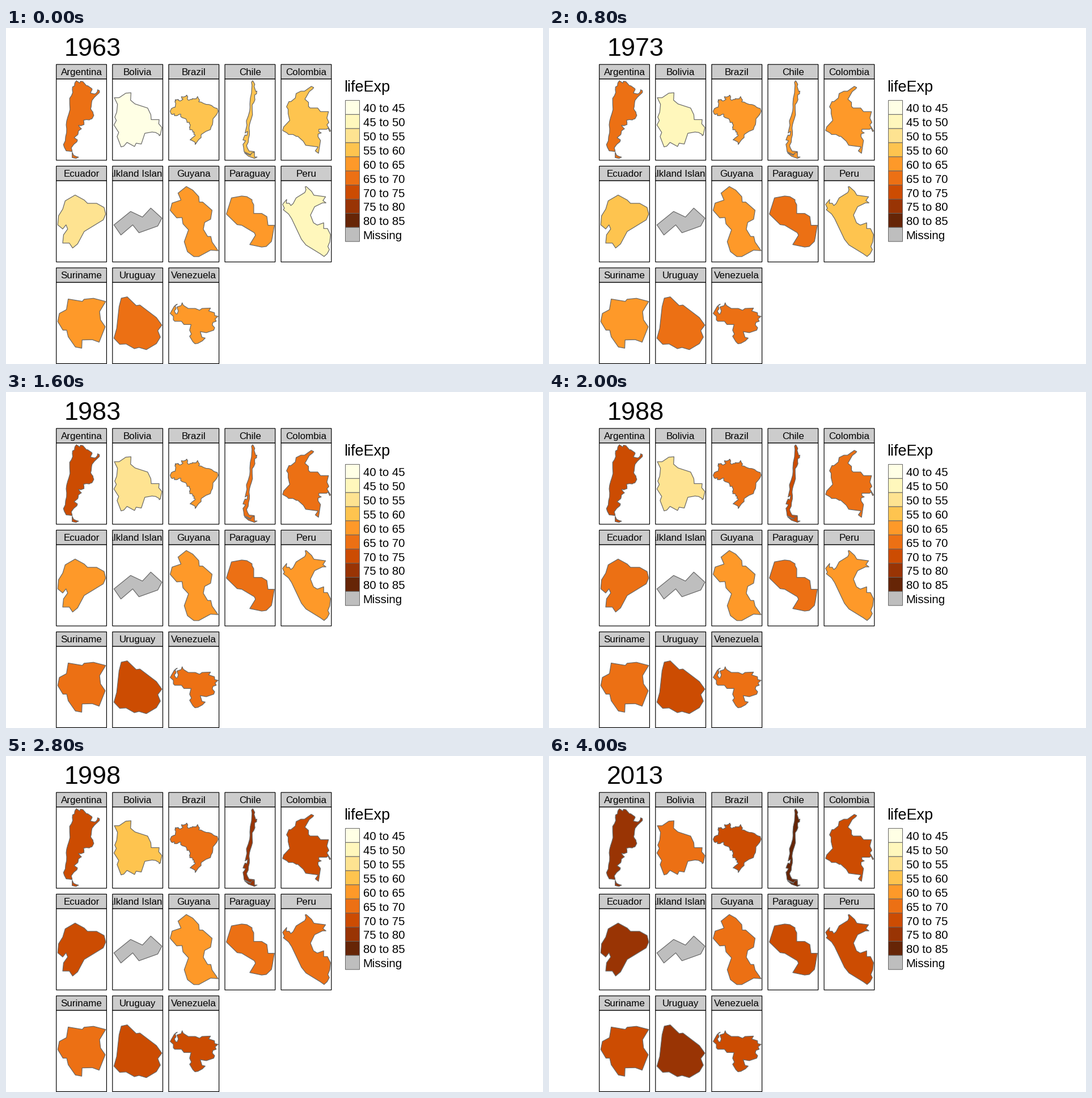
Recreate the animation shown at these times as a matplotlib script. Size 947 px wide and 592 px high, loop 4.4 s.

```python
import numpy as np
import matplotlib
import matplotlib.pyplot as plt
from matplotlib.animation import FuncAnimation
from matplotlib.collections import PolyCollection
from matplotlib.patches import Rectangle

W, H, DPI = 947, 592, 64
YEARS = range(1963, 2014, 5)
BINS = ["#FFFFE5", "#FFF7BC", "#FEE391", "#FEC44F", "#FE9929",
        "#EC7014", "#CC4C02", "#993404", "#662506"]
MISSING, EDGE = "#BEBEBE", "#666666"
PX = 72 / DPI
PANEL_W, STRIP_H, PANEL_H = 88.7, 25.5, 143.3

matplotlib.rcParams["font.family"] = "Liberation Sans"
fig = plt.figure(figsize=(W / DPI, H / DPI), dpi=DPI, facecolor="white")
ax = fig.add_axes([0, 0, 1, 1])
ax.set(xlim=(0, W), ylim=(H, 0))
ax.axis("off")
rng = np.random.default_rng(4)


def arc(*degrees):
    """Key points of a border in degrees west, degrees south."""
    return np.reshape(degrees, (-1, 2))


def rough(line, amount=0.07):
    """Break every segment at a point pushed sideways at random."""
    step = np.diff(line, axis=0)
    side = step[:, ::-1] * (1, -1)
    middle = line[:-1] + step / 2 + side * rng.uniform(-amount, amount, (len(step), 1))
    out = np.empty((2 * len(line) - 1, 2))
    out[::2], out[1::2] = line, middle
    return out


def back(line):
    return line[::-1]


def ring(*arcs):
    return np.vstack(arcs)


# Borders shared by two neighbours
arg_bol = arc(67.1, 22.7, 66.3, 21.8, 64.4, 22.8, 64, 22, 62.7, 22.2)
arg_pry = arc(62.7, 22.2, 60.8, 23.9, 60, 24, 57.8, 25.2, 57.6, 25.6, 58.6, 27.1,
              56.5, 27.5, 55.7, 27.4, 54.8, 26.6, 54.6, 25.7)
arg_bra = arc(54.6, 25.7, 53.6, 26.1, 53.6, 26.9, 56.3, 28.9, 57.63, 30.22)
arg_ury = arc(57.63, 30.22, 57.87, 31, 58.13, 33, 58.43, 33.9)
arg_chl = rough(arc(67.1, 22.7, 67.3, 24, 68.4, 24.5, 68.3, 26.9, 70, 29.4, 69.8, 34.2,
                    71.1, 37.6, 71.9, 40.8, 71.7, 44.2, 72.4, 47.7, 73.4, 49.3,
                    72.3, 51.4, 71.9, 52, 68.6, 52.3))
bol_chl = arc(67.1, 22.7, 67.8, 22.9, 68.8, 20.4, 68.4, 19.4, 69.6, 17.6)
bol_per = arc(69.6, 17.6, 69, 16.5, 69.4, 15.7, 68.9, 14.5, 68.7, 12.6, 69.5, 11)
bol_bra = arc(69.5, 11, 68.3, 11, 66.6, 9.9, 65.3, 9.8, 65.4, 11.6, 64.3, 12.5,
              61.1, 13.5, 60.3, 15.1, 60.2, 16.3, 58.2, 16.3, 58.3, 17.3, 57.5, 18.2,
              57.9, 20, 58.2, 20.2)
bol_pry = arc(58.2, 20.2, 58.2, 19.9, 59.1, 19.4, 60, 19.3, 61.8, 19.6, 62.7, 22.2)
bra_pry = arc(58.2, 20.2, 57.9, 20.7, 57.9, 22.1, 56.5, 22.1, 55.6, 22.6, 55.4, 24,
              54.3, 24, 54.6, 25.7)
bra_ury = arc(57.63, 30.22, 56.98, 30.1, 56, 30.9, 55.6, 30.85, 53.8, 32, 53.2, 32.7,
              53.65, 33.2, 53.37, 33.8)
bra_per = arc(69.5, 11, 70.5, 11, 70.5, 9.5, 72.2, 10.1, 73.2, 9.5, 74, 7.5, 72.9, 5.3,
              70.8, 4.3, 69.9, 4.3)
bra_col = arc(69.9, 4.3, 69.4, 1.1, 70, .2, 70, -.5, 69.2, -.8, 69.8, -1.1, 69.8, -1.7,
              67.9, -1.7, 67.5, -2, 67.1, -1.1, 66.9, -1.3)
bra_ven = arc(66.9, -1.3, 66.3, -.7, 65.5, -.8, 64.2, -1.5, 63.4, -2.3, 64.3, -2.5,
              64.8, -4.1, 63.1, -3.8, 61, -4.5, 60.73, -5.2)
bra_guy = arc(60.73, -5.2, 60.2, -5.24, 60.1, -4.6, 59.54, -4, 59.97, -2.8, 59.65, -1.8,
              59, -1.3, 58.5, -1.3, 57.3, -1.95, 56.54, -1.9)
bra_sur = arc(56.54, -1.9, 56, -1.8, 55.97, -2.5, 55.1, -2.52, 54.52, -2.31)
per_ecu = arc(80.3, 3.4, 80.4, 4.4, 79.6, 4.4, 79.2, 5, 78.6, 4.5, 77.8, 3, 75.5, 1.6,
              75.2, .9, 75.4, .1)
per_col = arc(75.4, .1, 75.1, .05, 73.7, 1.3, 73.1, 2.3, 70, 2.7, 70.7, 3.7, 69.9, 4.3)
col_ecu = arc(75.4, .1, 76.3, -.4, 77.4, -.4, 77.8, -.8, 78.9, -1.4)
col_ven = arc(71.3, -11.8, 72.2, -11.1, 73, -9.7, 73.3, -9.2, 72.4, -8.4, 72.4, -7.4,
              72, -7, 70.1, -7, 69.4, -6.1, 67.4, -6.1, 67.8, -4.5, 67.3, -3.4,
              67.8, -2.8, 66.9, -1.3)
ven_guy = arc(59.76, -8.37, 60.6, -7.7, 60.3, -7, 61.2, -6.7, 61.4, -5.96, 60.73, -5.2)
guy_sur = arc(57.15, -5.97, 57.3, -5.07, 57.9, -4.75, 58.04, -4.06, 57.6, -3.33,
              57.28, -3.33, 57.15, -2.77, 56.54, -1.9)

# Coasts
arg_sea = rough(arc(58.43, 33.9, 57.2, 35.3, 56.7, 36.7, 57.7, 38.2, 59.2, 38.7,
                    62.3, 38.8, 62.1, 40.7, 63.8, 41.2, 65.1, 41, 63.5, 42.5, 65.2, 43.5,
                    65.5, 45, 67.5, 46.3, 65.7, 47.3, 66, 48.1, 69.1, 50.7, 68.6, 52.3))
chl_sea = rough(arc(68.6, 52.3, 71, 53.8, 74.9, 52.3, 75.6, 48.7, 74.1, 46.9, 75.6, 46.6,
                    74.3, 44.1, 73.2, 44.4, 72.7, 42.4, 74.3, 43.2, 73.2, 39.3,
                    73.5, 37.2, 71.5, 32.4, 71.4, 29, 70.4, 23.6, 70.1, 19.8, 70.4, 18.3))
bra_sea = rough(arc(54.52, -2.31, 52.6, -2.4, 51.5, -4.2, 49.9, -1.4, 50.5, 0, 48.6, .2,
                    44.5, 2, 40, 2.9, 37.2, 4.8, 35.3, 5.3, 34.7, 7.3, 35.6, 9.6,
                    38.9, 13.5, 39.3, 18, 41, 22, 44.6, 23.4, 48.5, 25.9, 48.6, 28.3,
                    52.3, 32.2, 53.37, 33.8))
col_sea = arc(78.9, -1.4, 78.6, -2.3, 77.1, -3.9, 77.5, -5.6, 77.5, -6.7, 77.9, -7.3,
              77.3, -8.6, 76.8, -8.6, 75.7, -9.5, 75.5, -10.6, 74.3, -11.2, 73.4, -11.2,
              71.7, -12.4, 71.1, -12.1, 71.3, -11.8)
ecu_sea = arc(78.9, -1.4, 80.1, -.7, 80.4, .3, 80.9, 1.1, 81, 2.2, 80.4, 2.7, 80, 2.2,
              79.8, 2.7, 80.3, 3.4)
per_sea = arc(70.4, 18.3, 71.4, 17.6, 75.2, 15.3, 76.4, 13.8, 79, 8.4, 79.8, 7.2,
              81.2, 6.1, 80.9, 5.7, 81.4, 4.7, 80.3, 3.4)
guy_sea = arc(59.76, -8.37, 59.1, -8, 58.5, -7.35, 58.45, -6.8, 58.1, -6.8, 57.15, -5.97)
sur_sea = arc(57.15, -5.97, 55.95, -5.77, 55.8, -5.95, 55, -6.03, 53.96, -5.76,
              54.48, -4.9, 54.4, -4.2, 54, -3.62, 54.52, -2.31)
ury_sea = arc(53.37, 33.8, 53.8, 34.4, 54.9, 34.95, 55.7, 34.75, 56.2, 34.86,
              57.1, 34.43, 57.8, 34.46, 58.43, 33.9)
ven_sea = arc(71.3, -11.8, 71.9, -11.4, 71.6, -10.5, 72.1, -9.9, 71.7, -9.1, 71.3, -9.1,
              71, -9.9, 71.4, -11, 70.2, -11.4, 69.9, -12.2, 69.6, -11.5, 68.2, -10.6,
              66.2, -10.6, 65, -10.1, 64.3, -10.6, 61.9, -10.7, 62.4, -9.9, 60.8, -9.4,
              60.7, -8.6, 59.76, -8.37)

# Islands
fuego_east = arc(65.1, 54.7, 66.5, 55.25, 68.6, 54.9, 68.6, 52.6, 67.8, 53.9, 66.5, 54.4)
fuego_west = arc(68.6, 52.6, 68.6, 54.9, 67, 54.9, 68.6, 55.6, 72.3, 54.5, 74.7, 52.8,
                 71.1, 54.1, 70.3, 52.9)
falklands = arc(61.2, 51.85, 60, 51.25, 59.15, 51.5, 58.55, 51.1, 57.75, 51.55,
                58.05, 51.9, 59.4, 52.2, 59.85, 51.85, 60.7, 52.3)

# Name, outlines, first colour bin (None = no data), years in which the bin rises
COUNTRIES = [
    ("Argentina", [ring(arg_bol, arg_pry, arg_bra, arg_ury, arg_sea, back(arg_chl)),
                   fuego_east], 5, (1983, 2008)),
    ("Bolivia", [ring(bol_chl, bol_per, bol_bra, bol_pry, back(arg_bol))],
     0, (1973, 1983, 1993, 2003, 2008)),
    ("Brazil", [ring(bra_per, bra_col, bra_ven, bra_guy, bra_sur, bra_sea, back(bra_ury),
                     back(arg_bra), back(bra_pry), back(bol_bra))], 3, (1973, 1988, 2003)),
    ("Chile", [ring(arg_chl, chl_sea, back(bol_chl)), fuego_west],
     3, (1968, 1978, 1988, 1998, 2013)),
    ("Colombia", [ring(col_ecu, col_sea, col_ven, back(bra_col), back(per_col))],
     3, (1968, 1983, 1998)),
    ("Ecuador", [ring(ecu_sea, per_ecu, col_ecu)], 2, (1968, 1978, 1988, 1993, 2013)),
    ("Falkland Islands", [falklands], None, ()),
    ("Guyana", [ring(guy_sea, guy_sur, back(bra_guy), back(ven_guy))], 4, (2003,)),
    ("Paraguay", [ring(bol_pry, arg_pry, back(bra_pry))], 4, (1968, 2003)),
    ("Peru", [ring(per_sea, per_ecu, per_col, back(bra_per), back(bol_per))],
     1, (1968, 1973, 1983, 1993, 2003)),
    ("Suriname", [ring(sur_sea, back(bra_sur), back(guy_sur))], 4, (1978, 2013)),
    ("Uruguay", [ring(bra_ury, ury_sea, back(arg_ury))], 5, (1983, 2003)),
    ("Venezuela", [ring(ven_sea, ven_guy, back(bra_ven), back(col_ven))],
     4, (1973, 1993)),
]


def text(x, y, string, size, **kw):
    return ax.text(x, y, string, fontsize=size * PX, va="baseline", **kw)


def box(x, y, w, h, fill, edge="black", lw=1.2):
    return ax.add_patch(Rectangle((x, y), w, h, fc=fill, ec=edge, lw=lw * PX, snap=False))


def project(parts, cx, cy, width=84.6, height=137):
    """Fit outlines into a panel, degrees corrected at the middle latitude."""
    points = np.vstack(parts)
    low, high = points.min(0), points.max(0)
    mid = (low + high) / 2
    squeeze = np.cos(np.radians(mid[1]))
    span = high - low
    scale = min(width / (span[0] * squeeze), height / span[1])
    return [(p - mid) * (-scale * squeeze, scale) + (cx, cy) for p in parts]


def bin_colour(start, rises, year):
    if start is None:
        return MISSING
    return BINS[start + sum(year >= r for r in rises)]


maps = []
for i, (name, parts, start, rises) in enumerate(COUNTRIES):
    row, col = divmod(i, 5)
    x, y = 88.7 + 99.1 * col, 64.2 + 179.2 * row
    cx = x + PANEL_W / 2
    box(x, y + STRIP_H, PANEL_W, PANEL_H, "white")
    strip = box(x, y, PANEL_W, STRIP_H, "#CCCCCC")
    label = text(cx, y + 18.6, name, 17, ha="center", clip_on=True)
    label.set_clip_path(strip)
    shape = PolyCollection(project(parts, cx, y + 97.1),
                           edgecolors=EDGE, linewidths=1.2 * PX, zorder=2)
    ax.add_collection(shape, autolim=False)
    maps.append((shape, start, rises))

text(596, 112, "lifeExp", 27)
labels = [f"{a} to {a + 5}" for a in range(40, 85, 5)] + ["Missing"]
for i, (colour, label) in enumerate(zip(BINS + [MISSING], labels)):
    y = 127.5 + 24.87 * i
    box(598.5, y, 25, 24.87, colour, EDGE, 1)
    text(629.6, y + 20.8, label, 20.4)

title = text(102.2, 48.6, "", 45)


def draw(i):
    year = YEARS[i]
    title.set_text(str(year))
    for shape, start, rises in maps:
        shape.set_facecolor(bin_colour(start, rises, year))
    return [title] + [m[0] for m in maps]


anim = FuncAnimation(fig, draw, frames=len(YEARS), interval=400,
                     repeat=True, repeat_delay=0)
plt.show()
```
